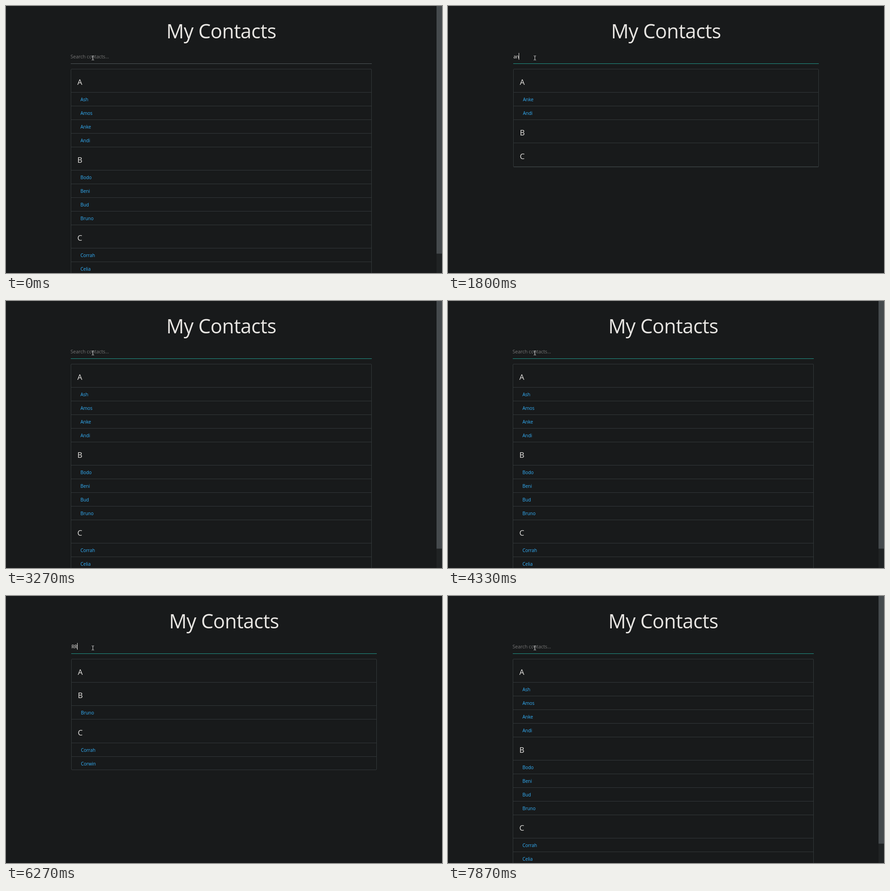
An HTML page for the animation above (8000 ms loop, 956x586 px).

```html
<!DOCTYPE html>
<html lang="en">
<head>
<meta charset="utf-8">
<title>My Contacts</title>
<style>
  html, body { margin: 0; width: 100%; height: 100%; overflow: hidden; background: #181a1b; }
  svg { display: block; width: 956px; height: 586px; }
  text { font-family: "Open Sans", "Noto Sans", sans-serif; fill: #e8e6e3; white-space: pre; }
  .title { font-size: 43px; letter-spacing: -0.5px; text-anchor: middle; }
  .input { font-size: 10.6px; letter-spacing: -0.1px; }
  .hint { fill: #757575; }
  .letter { font-size: 16.8px; font-weight: 500; }
  .name { font-size: 10.1px; font-weight: 500; letter-spacing: -0.1px; fill: #33b1fb; }
  .border { fill: none; stroke: #33383a; }
  .rule { fill: #33383a; }
</style>
</head>
<body>
<svg viewBox="0 0 956 586">
  <text id="title" class="title" y="71">My Contacts</text>
  <text id="input" y="115"></text>
  <rect id="underline" y="126" height="1" fill="#50575a"/>
  <rect id="glow" y="126" height="1" fill="#22978b"/>
  <g id="list"></g>
  <rect id="caret" y="103" width="1" height="15" fill="#e8e6e3"/>
  <path d="M188 109.5h2M191 109.5h2M190.5 110v8M188 118.5h2M191 118.5h2" fill="none" stroke="#e4e4e4"/>
  <g id="scrollbar">
    <rect x="944" width="12" height="586" fill="#202324"/>
    <rect x="944" width="12" height="543.5" fill="#454a4d"/>
  </g>
</svg>
<script>
const LOOP = 8000;
const TOP = 138, HEADER = 51.45, ROW = 29.93;

const groups = {
  A: ["Ash", "Amos", "Anke", "Andi"],
  B: ["Bodo", "Beni", "Bud", "Bruno"],
  C: ["Corrah", "Celia", "Corwin"]
};

// [time, typed text, active filter]; the filter trails the typing
const steps = [
  [0, "", ""], [1200, "a", ""], [1330, "a", "a"],
  [1670, "an", "a"], [1800, "an", "an"],
  [2600, "a", "an"], [2730, "a", "a"], [2870, "", "a"], [2930, "", ""],
  [6070, "R", ""], [6130, "R", "r"], [6270, "RR", "r"], [6330, "RR", "rr"],
  [7270, "R", "rr"], [7400, "R", "r"], [7470, "", "r"], [7530, "", ""]
];

const caretFlips = [130, 670, 1200, 2200, 2730, 3270, 3800, 4330,
                    4870, 5400, 5930, 6800, 7330, 7870];

// [time, strength of the focus colour]
const focusSteps = [[0, 0], [70, 0.2], [130, 0.6], [270, 0.9], [330, 1]];

const $ = id => document.getElementById(id);
const set = (el, attrs) => {
  for (const key in attrs) el.setAttribute(key, attrs[key]);
};
const latest = (list, t) => list.filter(entry => entry[0] <= t).pop();

const label = (cls, x, y, text) =>
  `<text class="${cls}" x="${x}" y="${Math.round(y)}">${text}</text>`;

function listMarkup(filter, left, right) {
  let y = TOP, out = "", lastShown = false;
  const rule = () =>
    `<rect class="rule" x="${left + 1}" y="${Math.floor(y)}" width="${right - left - 2}" height="1"/>`;

  for (const [letter, names] of Object.entries(groups)) {
    out += label("letter", left + 14.4, y + 35, letter);
    y += HEADER;
    out += rule();
    names.forEach(name => {
      lastShown = name.toLowerCase().includes(filter);
      if (!lastShown) return;
      out += label("name", left + 21.3, y + 19.4, name);
      y += ROW;
      if (name !== groups.C[2]) out += rule();
    });
  }
  // the very last item carries no rule of its own
  const bottom = Math.floor(y) + (lastShown ? -1 : 1);
  return out + `<rect class="border" x="${left + 0.5}" y="${TOP + 0.5}" rx="1.5"
    width="${right - left - 1}" height="${bottom - TOP}"/>`;
}

let shown;

function showStep(step) {
  const [, typed, filter] = step;
  const full = !filter;
  const width = full ? 944 : 956;
  const left = Math.round(width * 0.15);
  const right = Math.round(width * 0.85);

  $("scrollbar").style.display = full ? "" : "none";
  set($("title"), { x: width / 2 });
  set($("input"), { x: width * 0.15, class: typed ? "input" : "input hint" });
  $("input").textContent = typed || "Search contacts...";
  for (const id of ["underline", "glow"]) set($(id), { x: left, width: right - left });
  $("list").innerHTML = listMarkup(filter, left, right);

  const advance = typed ? $("input").getComputedTextLength() : 0;
  set($("caret"), { x: Math.round(left + advance) });
}

function draw(t) {
  const step = latest(steps, t);
  if (step !== shown) showStep(shown = step);

  set($("glow"), { opacity: latest(focusSteps, t)[1] });

  const caretOn = caretFlips.filter(time => time <= t).length % 2;
  set($("caret"), { opacity: caretOn });
}

const start = performance.now();
function tick() {
  draw((performance.now() - start) % LOOP);
  requestAnimationFrame(tick);
}
tick();
</script>
</body>
</html>
```
